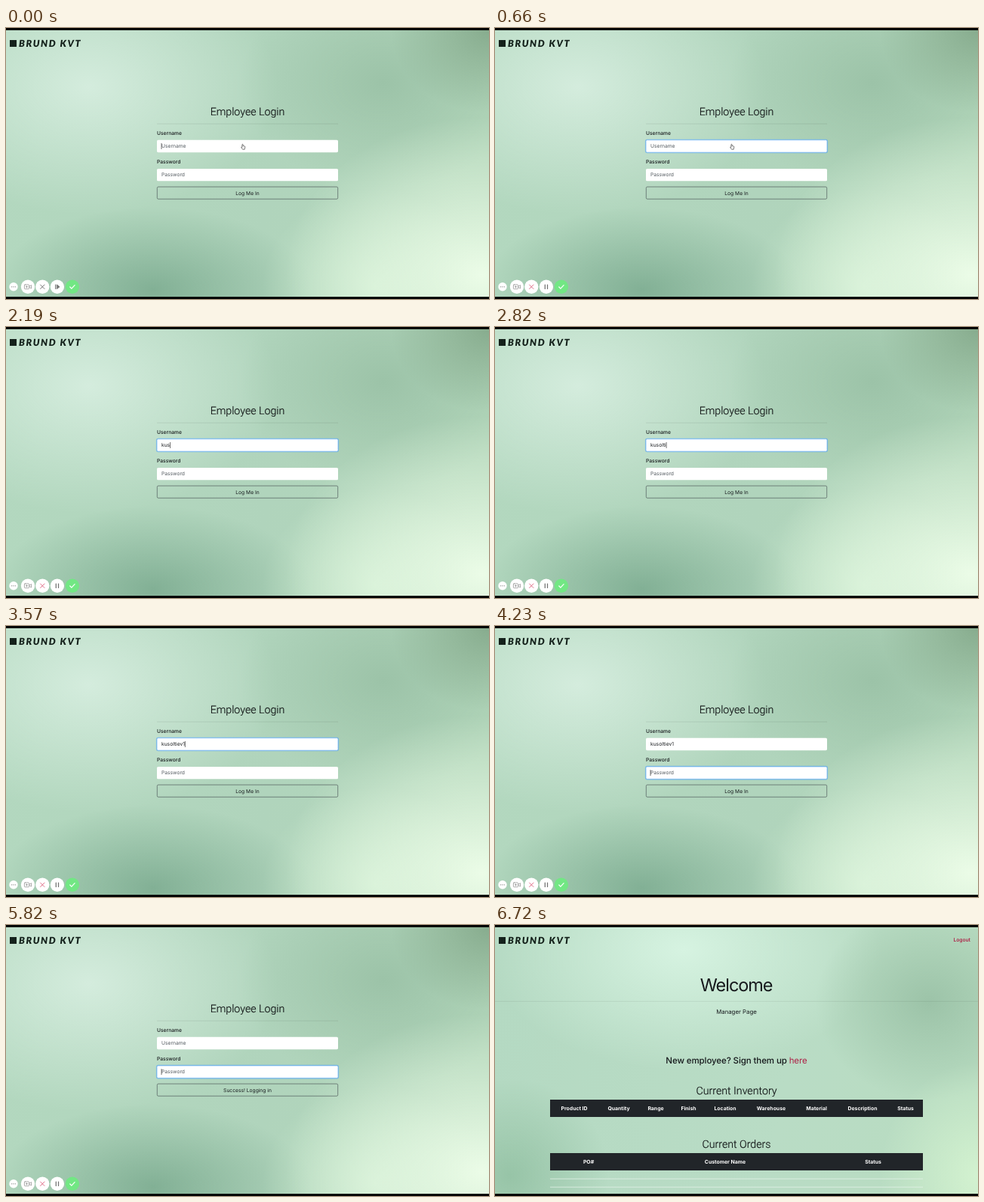
Write an HTML page that moves like this. It is 640 by 360 pixels and loops after 6870 ms.

```html
<!DOCTYPE html>
<html lang="en">
<head>
<meta charset="utf-8">
<title>Employee login</title>
<style>
html, body { margin: 0; width: 100%; height: 100%; overflow: hidden; background: #000; }
.bg, svg { position: absolute; left: 0; top: 0; width: 640px; height: 360px; }
.bg { top: 3px; height: 354px; }
#loginBg { background:
  radial-gradient(130px 110px at 640px 0, #87ac8e, transparent),
  radial-gradient(260px 210px at 630px 325px, #ebfce7, transparent),
  radial-gradient(150px 130px at 490px 340px, #cdebd0, transparent),
  radial-gradient(210px 110px at 195px 345px, #82b095, transparent),
  radial-gradient(190px 140px at 500px 70px, #9cc3a8, transparent),
  radial-gradient(250px 170px at 110px 75px, #d4ecdd, transparent),
  linear-gradient(100deg, #b3d8bf, #b0d4bc 55%, #b2d6b9); }
#homeBg { background:
  radial-gradient(130px 150px at 640px 330px, #d3f2d0, transparent),
  radial-gradient(150px 130px at 575px 100px, #9cc3a8, transparent),
  radial-gradient(130px 130px at 20px 330px, #97c4a7, transparent),
  radial-gradient(260px 160px at 250px 30px, #d6f3e1, transparent),
  linear-gradient(100deg, #b4d9c2, #b9dcc5 60%, #b8dcc0); }
text { font-family: Inter, sans-serif; font-size: 6.7px; fill: #16191c; text-rendering: geometricPrecision; white-space: pre; }
.mid { text-anchor: middle; }
.light { font-family: Roboto, sans-serif; font-weight: 300; font-size: 14.2px; fill: #0b0d0f; stroke: #0b0d0f; stroke-width: .15; }
.label { font-weight: 500; }
.th { font-weight: 700; font-size: 6.9px; fill: #fff; }
.link { fill: #ad2348; }
.hint { fill: #51585e; }
.icon { fill: none; stroke: #777; stroke-width: 1; stroke-linecap: round; }
</style>
</head>
<body>
<div class="bg" id="loginBg"></div>
<div class="bg" id="homeBg"></div>
<svg viewBox="0 0 640 360">
  <rect x="5" y="16" width="9" height="9" fill="#14211b"/>
  <text x="17" y="25" style="font: italic 900 12.6px Lato, sans-serif; letter-spacing: 1.6px; fill: #14211b">BRUND KVT</text>

  <g id="login">
    <text class="mid light" x="320" y="116">Employee Login</text>
    <path d="M200 127.3H440" stroke="#000" stroke-opacity=".12" stroke-width=".7"/>
    <text class="label" x="200" y="142.3">Username</text>
    <text class="label" x="200" y="180.3">Password</text>
    <g id="fields"></g>
    <rect x="200.3" y="211" width="239.4" height="16.2" rx="1.6" fill="none" stroke="#343a40" stroke-width=".55"/>
    <text class="mid" id="button" x="320" y="221.5"></text>
    <path id="caret" stroke="#111" stroke-width=".6"/>
    <path id="hand" d="M312.9 160.4l-1.2-2q.2-.9 1.2 0v-3.6q.6-.9 1.2 0v1.8l2.2.5q.6.2.5 1l-.5 2.3v.8h-2.8z" fill="#fff" stroke="#222" stroke-width=".6"/>

    <g id="tools">
      <g fill="#fff">
        <circle cx="10" cy="343.8" r="5.7"/><circle cx="29" cy="343.8" r="9.2"/>
        <circle cx="48.3" cy="343.8" r="9.2"/><circle cx="67.9" cy="343.8" r="9.2"/>
      </g>
      <circle cx="87.9" cy="343.8" r="9.2" fill="#72e784"/>
      <g class="icon">
        <path d="M7.7 343.8h.01M10 343.8h.01M12.3 343.8h.01" stroke-width="1.3"/>
        <g stroke="#8c8c8c" stroke-width=".7">
          <rect x="24.4" y="340.9" width="6.2" height="5.8" rx=".8"/>
          <path d="M30.8 343.2l2.7-1.6v4.4l-2.7-1.6M27.5 342.6v2.4M26.3 343.8h2.4"/>
        </g>
        <path id="cross" d="M45.6 341.1l5.4 5.4m0-5.4l-5.4 5.4"/>
        <path id="pause" d="M66.3 341.2v5.2m3.2-5.2v5.2" stroke-width="1.3"/>
        <path id="resume" d="M65.6 341v5.6m2-5.4l3.4 2.6-3.4 2.6z" fill="#777"/>
        <path d="M84.8 344l2.1 2.1 4.2-4.4" stroke="#fff" stroke-width="1.2"/>
      </g>
    </g>
  </g>

  <g id="home">
    <text class="link" x="630" y="22.3" text-anchor="end" font-weight="600">Logout</text>
    <text class="mid" x="319.6" y="88" style="font-size: 23.4px; letter-spacing: -1px">Welcome</text>
    <path d="M0 101.4H640" stroke="#000" stroke-opacity=".1" stroke-width=".7"/>
    <text class="mid" x="320" y="118.3" style="font-size: 7.8px">Manager Page</text>
    <text class="mid" x="320" y="184" style="font-size: 11.5px; font-weight: 500; letter-spacing: -.1px">New employee? Sign them up <tspan class="link" font-weight="400">here</tspan></text>
    <text class="mid light" x="320" y="224.5">Current Inventory</text>
    <text class="mid light" x="320" y="296">Current Orders</text>
    <path d="M73 337.2H567M73 348.2H567" stroke="#e3f2e7" stroke-width=".8"/>
  </g>

  <path d="M0 0H640V3H0zM0 357H640V360H0z"/>
</svg>
<script>
const LOOP = 6870, FOCUS_PASSWORD = 3980, SUCCESS = 5400, HOME = 6400;
const USER = "kusoltiev1";
const userKeys = [900, 1050, 2000, 2200, 2380, 2560, 2740, 3000, 3200, 3500];
const passKeys = Array.from({ length: 8 }, (_, i) => 4450 + i * 95);
const blinkResets = [0, ...userKeys, FOCUS_PASSWORD, ...passKeys, SUCCESS];

const $ = id => document.getElementById(id);
const show = (el, on) => el.style.display = on ? "" : "none";
const clamp = v => Math.max(0, Math.min(1, v));
const fade = (t, start) => clamp((t - start) / 150);

function add(parent, tag, attrs, text = "") {
  const el = document.createElementNS("http://www.w3.org/2000/svg", tag);
  for (const k in attrs) el.setAttribute(k, attrs[k]);
  el.textContent = text;
  return parent.appendChild(el);
}

function field(y, hint) {
  const box = { x: 200, y, width: 240, height: 16.4, rx: 1.6 };
  const ring = add($("fields"), "rect", { ...box, fill: "none", stroke: "#4ba0f5", "stroke-opacity": .5, "stroke-width": 2.2 });
  add($("fields"), "rect", { ...box, fill: "#fff" });
  const edge = add($("fields"), "rect", { ...box, fill: "none", stroke: "#6fb2f5", "stroke-width": .7 });
  const text = add($("fields"), "text", { x: 206, y: y + 10.5 });
  return {
    y, text,
    set(value, focus) {
      text.textContent = value || hint;
      text.setAttribute("class", value ? "" : "hint");
      ring.style.opacity = edge.style.opacity = focus;
    },
    end: value => 206 + (value ? text.getComputedTextLength() + .4 : 0)
  };
}

function header(y, cells) {
  add($("home"), "rect", { x: 73, y, width: 494, height: 23, fill: "#212529" });
  for (const [label, x] of cells) add($("home"), "text", { class: "mid th", x, y: y + 13.9 }, label);
}

const user = field(148.8, "Username"), pass = field(186.9, "Password");
header(232, [["Product ID", 105], ["Quantity", 164], ["Range", 213], ["Finish", 256.5], ["Location", 305],
  ["Warehouse", 366], ["Material", 426], ["Description", 487], ["Status", 544]]);
header(303, [["PO#", 124], ["Customer Name", 305], ["Status", 501]]);

function draw(t) {
  const home = t >= HOME, done = t >= SUCCESS, onPass = t >= FOCUS_PASSWORD;
  for (const id of ["home", "homeBg"]) show($(id), home);
  for (const id of ["login", "loginBg"]) show($(id), !home);
  if (home) return;

  const typed = keys => done ? 0 : keys.filter(k => k <= t).length;
  const name = USER.slice(0, typed(userKeys)), dots = "•".repeat(typed(passKeys));
  user.set(name, fade(t, 30) * (1 - fade(t, FOCUS_PASSWORD)));
  pass.set(dots, fade(t, FOCUS_PASSWORD));
  $("button").textContent = done ? "Success! Logging in" : "Log Me In";

  const active = onPass ? pass : user;
  const x = active.end(onPass ? dots : name);
  const since = t - Math.max(...blinkResets.filter(k => k <= t));
  $("caret").setAttribute("d", `M${x} ${active.y + 4.2}v8`);
  show($("caret"), since % 1000 < 500);
  show($("hand"), t < userKeys[0]);

  const recording = t >= 120;
  show($("pause"), recording);
  show($("resume"), !recording);
  $("cross").style.stroke = recording ? "#e0708a" : "#777";
}

const start = performance.now();
function tick() {
  draw((performance.now() - start) % LOOP);
  requestAnimationFrame(tick);
}
tick();
</script>
</body>
</html>
```
